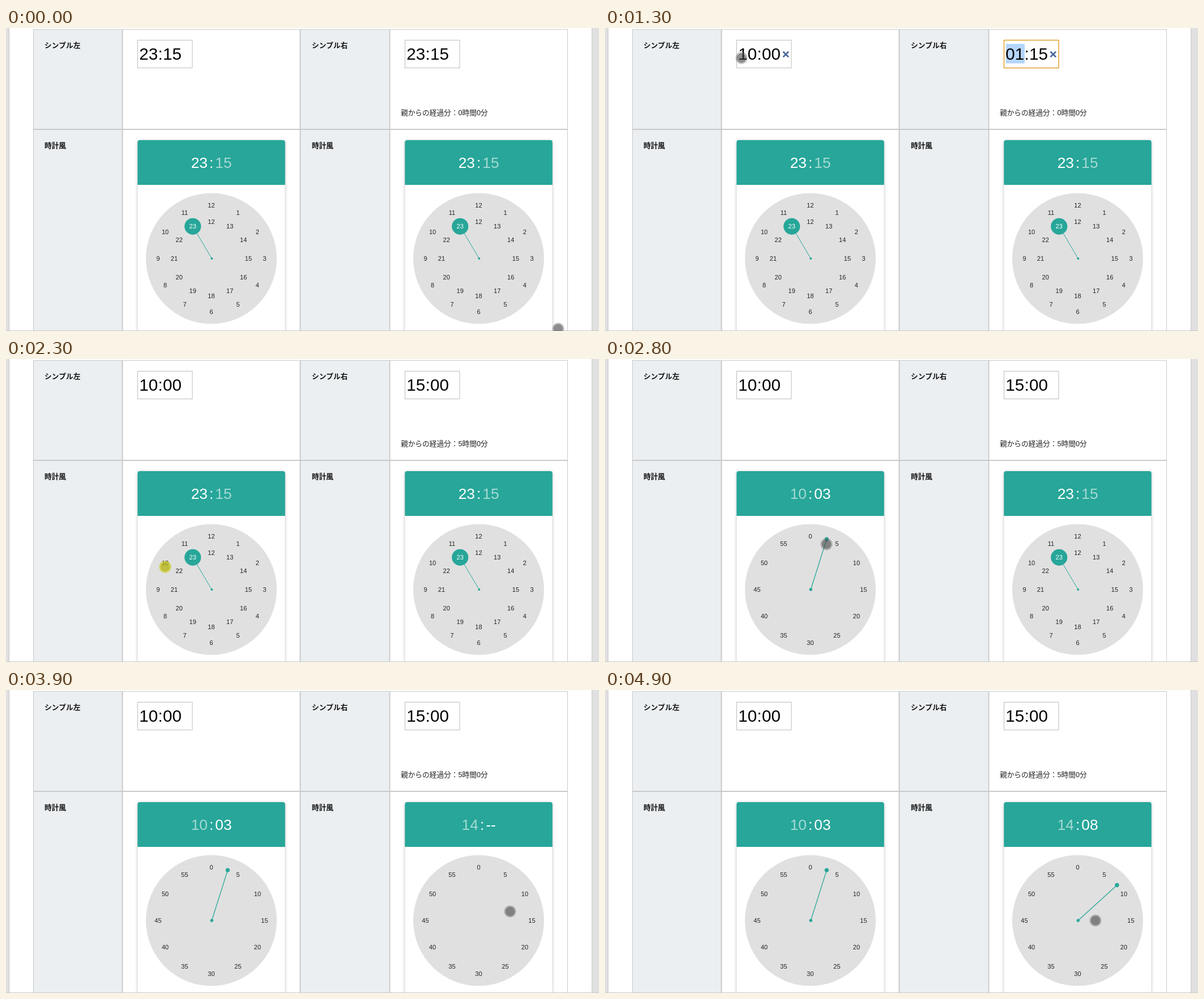
An HTML page with a canvas for the animation above (5100 ms loop, 1047x535 px).

```html
<!DOCTYPE html>
<html lang="ja">
<head>
<meta charset="utf-8">
<style>
  html, body { margin: 0; width: 100%; height: 100%; overflow: hidden; background: #e0e0e0; }
  canvas { display: block; }
</style>
</head>
<body>
<canvas id="stage" width="1047" height="535"></canvas>
<script>
const g = document.getElementById('stage').getContext('2d');
const TEAL = '#27a699', LINE = '#c9c9c9', GREY = '#e0e0e0';
const LATIN = '"Liberation Sans", Arial, sans-serif';
const JP = '"Noto Sans CJK JP", "Noto Sans CJK", sans-serif';
const LOOP = 5100, STEP = 100;   // the picture changes once per step

// One entry per column; all times are in steps
const columns = [
  { dx: 0, label: 'シンプル左', focus: 7, firstKey: 9, blur: 12, leave: 19,
    hour: 10, pickHour: 23, minute: 3, pickMinute: 27 },
  { dx: 472, label: 'シンプル右', focus: 12, firstKey: 13, blur: 23, leave: 23,
    hour: 14, pickHour: 37, minute: 8, pickMinute: 41 }
];
columns[0].typed = '10';
columns[1].typed = '15';

const clicks = [columns[0].focus, ...columns.flatMap(c => [c.pickHour, c.pickMinute])];

const moves = [
  { from: 0, to: 6, x: 241, y: 53 },
  { from: 15, to: 18, x: 366, y: 363 },
  { from: 18, to: 22, x: 281, y: 367 },
  { from: 24, to: 27, x: 391, y: 327 },
  { from: 28, to: 30, x: 740, y: 324 },
  { from: 30, to: 37, x: 890, y: 391 },
  { from: 39, to: 41, x: 887, y: 360 },
  { from: 43, to: 49, x: 866, y: 407 }
];

const clamp = v => Math.max(0, Math.min(1, v));
const ease = v => v * v * (3 - 2 * v);
const pad = v => String(v).padStart(2, '0');

function rect(x, y, w, h, color) {
  g.fillStyle = color;
  g.fillRect(x, y, w, h);
}

function disc(x, y, r, color) {
  g.fillStyle = color;
  g.beginPath();
  g.arc(x, y, r, 0, Math.PI * 2);
  g.fill();
}

function panel(x, y, w, h, radii, color) {
  g.fillStyle = color;
  g.beginPath();
  g.roundRect(x, y, w, h, radii);
  g.fill();
}

function line(x1, y1, x2, y2, w, color) {
  g.lineWidth = w;
  g.strokeStyle = color;
  g.beginPath();
  g.moveTo(x1, y1);
  g.lineTo(x2, y2);
  g.stroke();
}

function text(str, x, y, font, color, align = 'left') {
  g.font = font;
  g.fillStyle = color;
  g.textAlign = align;
  g.fillText(str, x, y);
}

function page() {
  rect(0, 0, 1047, 535, GREY);
  rect(5, 0, 1030, 535, LINE);
  rect(6, 0, 1028, 535, '#fff');
  for (const x of [49, 520]) rect(x, 3, 156, 532, '#ebeff2');
  for (const x of [204.5, 518.5, 676.5]) rect(x, 2, 2, 533, LINE);
  for (const x of [48, 991]) rect(x, 2, 1, 533, LINE);
  rect(48, 2, 944, 1, LINE);
  rect(48, 178, 944, 2, LINE);
}

// Two keys replace the hours, the third clears the minutes
function typedTime(c, s) {
  const keys = s - c.firstKey + 1;
  return {
    h: keys < 1 ? '23' : pad(c.typed.slice(0, keys)),
    m: keys < 3 ? '15' : '00',
    field: s < c.focus || s >= c.blur ? '' : keys < 2 ? 'h' : 'm'
  };
}

function timeInput(c, s) {
  const { h, m, field } = typedTime(c, s);
  const font = '29.6px ' + LATIN;
  if (field) rect(field === 'h' ? 236 : 277, 28, 33, 34.5, '#b4d5fe');
  g.lineWidth = field ? 1.4 : 1;
  g.strokeStyle = field ? '#dd9c22' : '#bdbdbd';
  g.strokeRect(232.5, 21.5, 96.5, 49);
  text(h, 235.2, 56, font, '#000');
  text(':', 268.5, 56, font, '#000');
  text(m, 277, 56, font, '#000');
  if (s >= c.focus && s < c.leave) {
    for (const d of [4.8, -4.8]) line(314.5, 46.5 - d, 324.1, 46.5 + d, 2.8, '#4a6b9d');
  }
}

function elapsed(s) {
  const [start, end] = columns.map(c => {
    const { h, m } = typedTime(c, s);
    return h * 60 + +m;
  });
  const d = Math.max(0, end - start);
  text(`親からの経過分：${Math.floor(d / 60)}時間${d % 60}分`, 697, 153.5,
    `300 12.7px "Liberation Sans", ${JP}`, '#222');
}

function header(h, m, onMinutes) {
  const font = '26.4px ' + LATIN, dim = 'rgba(255,255,255,.58)';
  g.font = font;
  const wh = g.measureText(h).width, wc = g.measureText(':').width + 6;
  const x = 362.7 - (wh + wc + g.measureText(m).width) / 2;
  text(h, x, 246.5, font, onMinutes ? dim : '#fff');
  text(':', x + wh + 3, 246.5, font, '#fff');
  text(m, x + wh + wc, 246.5, font, onMinutes ? '#fff' : dim);
}

function polar(deg, r) {
  const a = deg * Math.PI / 180;
  return [r * Math.sin(a), -r * Math.cos(a)];
}

function ring(r, label, scale) {
  for (let i = 0; i < 12; i++) {
    const [x, y] = polar(i * 30, r * scale);
    text(label(i), x, y + 4 * scale, 11.1 * scale + 'px ' + LATIN, '#222', 'center');
  }
}

function hand(deg, r, dot, tip, w) {
  const [x, y] = polar(deg, r);
  line(.8, 0, x, y, w, TEAL);
  disc(.8, 0, dot, TEAL);
  disc(x, y, tip, TEAL);
  return [x, y];
}

function dial(c, s) {
  const p = clamp((s - c.pickHour) / 2);
  disc(0, 0, 115.5, GREY);
  g.globalAlpha = 1 - p;
  ring(94, i => i || 12, 1 + .15 * p);
  ring(65.5, i => i ? i + 12 : 12, 1 + .15 * p);
  g.globalAlpha = p;
  ring(94, i => i * 5, .8 + .2 * p);
  g.globalAlpha = 1;
  if (p === 0) {
    const [x, y] = hand(330, 65.5, 2, 14.6, 1);
    text('23', x, y + 4, '11.1px ' + LATIN, '#fff', 'center');
  }
  if (s > c.pickMinute) hand(c.minute * 6, 93.5, 2.7, 3.7, 1.3);
}

function clock(c, s) {
  g.save();
  g.shadowColor = 'rgba(0,0,0,.28)';
  g.shadowBlur = 5;
  g.shadowOffsetY = 1;
  panel(232.5, 198, 260, 360, 4, '#fff');
  g.restore();
  panel(232.3, 198, 260.5, 79, [4, 4, 0, 0], TEAL);
  if (s <= c.pickHour) header('23', '15', false);
  else header(pad(c.hour), s > c.pickMinute ? pad(c.minute) : '--', true);
  g.translate(362.5, 407);
  dial(c, s);
}

function column(c, s) {
  const bold = 'bold 12.7px ' + JP;
  g.save();
  g.translate(c.dx, 0);
  text(c.label, 68, 35, bold, '#111');
  text('時計風', 68, 212, bold, '#111');
  timeInput(c, s);
  clock(c, s);
  g.restore();
}

function pointer(s) {
  let x = 975, y = 531;
  for (const m of moves) {
    const k = ease(clamp((s - m.from) / (m.to - m.from)));
    x += (m.x - x) * k;
    y += (m.y - y) * k;
  }
  const [core, rim] = clicks.includes(s)
    ? ['181,180,11,.75', '215,210,40,.75']
    : ['64,64,64,.6', '110,110,110,.42'];
  const fill = g.createRadialGradient(x, y, 0, x, y, 11);
  fill.addColorStop(.7, `rgba(${core})`);
  fill.addColorStop(.8, `rgba(${rim})`);
  fill.addColorStop(.92, `rgba(${rim})`);
  fill.addColorStop(1, 'rgba(128,128,128,0)');
  disc(x, y, 11, fill);
}

function draw() {
  const s = Math.floor(performance.now() % LOOP / STEP);
  page();
  for (const c of columns) column(c, s);
  elapsed(s);
  rect(0, 534, 1047, 1, LINE);
  pointer(s);
  requestAnimationFrame(draw);
}
draw();
</script>
</body>
</html>
```
